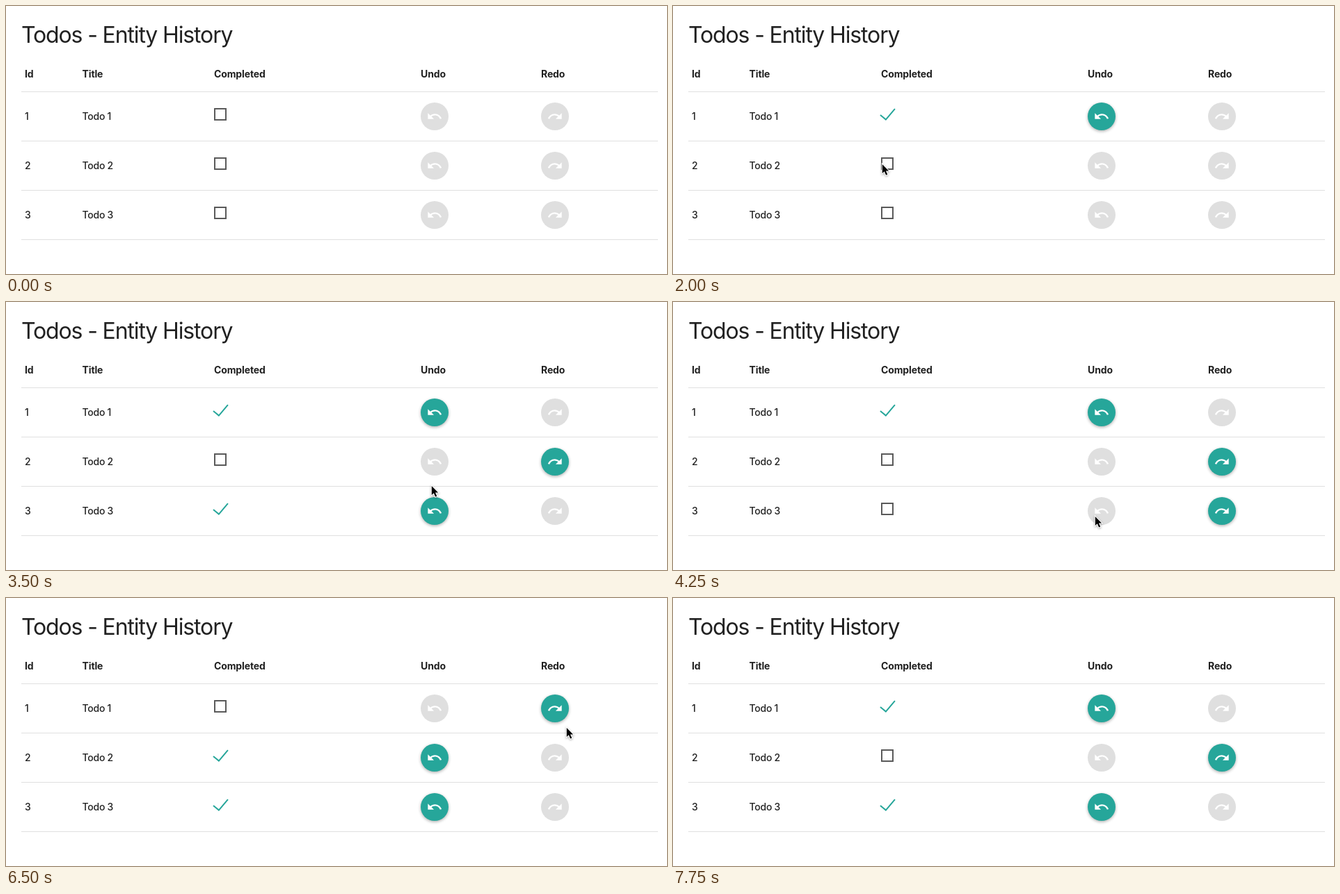
These frames come from a looping animation (950x386 px, 9250 ms). An HTML page with a canvas:

```html
<!DOCTYPE html>
<html lang="en">
<head>
<meta charset="utf-8">
<title>Todos</title>
<style>
  html, body { margin: 0; width: 100%; height: 100%; overflow: hidden; background: #fff; }
  canvas { display: block; width: 950px; height: 386px; }
</style>
</head>
<body>
<canvas id="stage" width="950" height="386"></canvas>
<script>
const ctx = document.getElementById('stage').getContext('2d');
const LOOP = 9250, STEP = 250, LAST_STEP = 30;
const ROWS = 3, ROW_HEIGHT = 71, TABLE_TOP = 123;
const TEAL = '#26a69a', GREY = '#dfdfdf', INK = '#212121';
const FONT = 'Inter, Roboto, sans-serif';
const COLUMNS = { Id: 27, Title: 109.5, Completed: 299, Undo: 596, Redo: 769 };

// The pointer enters at the start; each click flips the row under it.
const start = { step: 1, x: 741, y: 344 };
const clicks = [
  { step: 6, x: 305, y: 170 },
  { step: 9, x: 300, y: 227 },
  { step: 10, x: 296, y: 297 },
  { step: 13, x: 613, y: 249 },
  { step: 17, x: 606, y: 308 },
  { step: 19, x: 612, y: 165 },
  { step: 21, x: 793, y: 215 },
  { step: 24, x: 795, y: 313 },
  { step: 27, x: 805, y: 186 },
  { step: 30, x: 605, y: 248 }
];

const undoIcon = new Path2D('M12.5 8c-2.65 0-5.05.99-6.9 2.6L2 7v9h9l-3.62-3.62c1.39-1.16 3.16-1.88 5.12-1.88 3.54 0 6.55 2.31 7.6 5.5l2.37-.78C21.08 11.03 17.15 8 12.5 8z');
const arrow = new Path2D('M.8 1V14L3.8 11.3 6.1 16.6 8.3 15.7 6 10.5H10.1Z');

const rowAt = y => Math.floor((y - TABLE_TOP) / ROW_HEIGHT);
const ease = p => p * p * (3 - 2 * p);
const mix = (a, b, p) => Math.round(a + (b - a) * p);

function text(string, x, y, size, weight, spacing) {
  ctx.font = `${weight} ${size}px ${FONT}`;
  ctx.letterSpacing = spacing + 'px';
  ctx.fillStyle = INK;
  ctx.fillText(string, x, y);
}

function setShadow(color, blur, y) {
  ctx.shadowColor = color;
  ctx.shadowBlur = blur;
  ctx.shadowOffsetY = y;
}

function button(x, y, active, mirrored) {
  ctx.save();
  ctx.translate(x, y);
  if (active) setShadow('rgba(0,0,0,.32)', 4, 1.5);
  ctx.beginPath();
  ctx.arc(0, 0, 20, 0, Math.PI * 2);
  ctx.fillStyle = active ? TEAL : GREY;
  ctx.fill();
  setShadow('transparent', 0, 0);
  const scale = 23.2 / 24;
  ctx.scale(mirrored ? -scale : scale, scale);
  ctx.translate(-12, -12);
  ctx.fillStyle = '#fff';
  ctx.fill(undoIcon);
  ctx.restore();
}

function checkbox(y, checked) {
  ctx.save();
  ctx.lineWidth = 2;
  if (checked) {
    ctx.translate(306, y + 6);
    ctx.rotate(40 * Math.PI / 180);
    ctx.strokeStyle = TEAL;
    ctx.beginPath();
    ctx.moveTo(-11.3, -1);
    ctx.lineTo(-1, -1);
    ctx.lineTo(-1, -21.3);
    ctx.stroke();
  } else {
    ctx.strokeStyle = '#5a5a5a';
    ctx.strokeRect(300, y - 11, 16, 16);
  }
  ctx.restore();
}

function pointer(step) {
  if (step < start.step || step > LAST_STEP) return;
  const next = clicks.findIndex(click => click.step >= step);
  const to = clicks[next], from = clicks[next - 1] || start;
  // Arrive one step early and rest there until the click.
  const travel = Math.max(1, to.step - from.step - 1);
  const p = ease(Math.min(1, (step - from.step) / travel));
  ctx.save();
  ctx.translate(mix(from.x, to.x, p), mix(from.y, to.y, p));
  setShadow('rgba(0,0,0,.35)', 3, 1);
  ctx.strokeStyle = '#fff';
  ctx.lineWidth = 2;
  ctx.stroke(arrow);
  setShadow('transparent', 0, 0);
  ctx.fillStyle = '#000';
  ctx.fill(arrow);
  ctx.restore();
}

function drawRow(row, step) {
  const y = TABLE_TOP + 36 + ROW_HEIGHT * row;
  const flips = clicks.filter(click => click.step <= step && rowAt(click.y) === row).length;
  const checked = flips % 2 === 1;
  text(String(row + 1), COLUMNS.Id, y + 5, 14, 500, 0);
  text(`Todo ${row + 1}`, COLUMNS.Title, y + 5, 14, 500, -0.25);
  checkbox(y, checked);
  button(COLUMNS.Undo + 20, y, checked, false);
  button(COLUMNS.Redo + 20, y, flips > 0 && !checked, true);
}

function draw(step) {
  ctx.fillStyle = '#fff';
  ctx.fillRect(0, 0, 950, 386);
  text('Todos - Entity History', 22, 53, 32, 400, -1.14);
  for (const [label, x] of Object.entries(COLUMNS)) text(label, x, 103, 14, 700, -0.12);
  ctx.fillStyle = '#e0e0e0';
  for (let i = 0; i <= ROWS; i++) ctx.fillRect(22, TABLE_TOP + ROW_HEIGHT * i, 915, 1);
  for (let row = 0; row < ROWS; row++) drawRow(row, step);
  pointer(step);
}

function frame() {
  draw(Math.floor(performance.now() % LOOP / STEP));
  requestAnimationFrame(frame);
}
frame();
</script>
</body>
</html>
```
